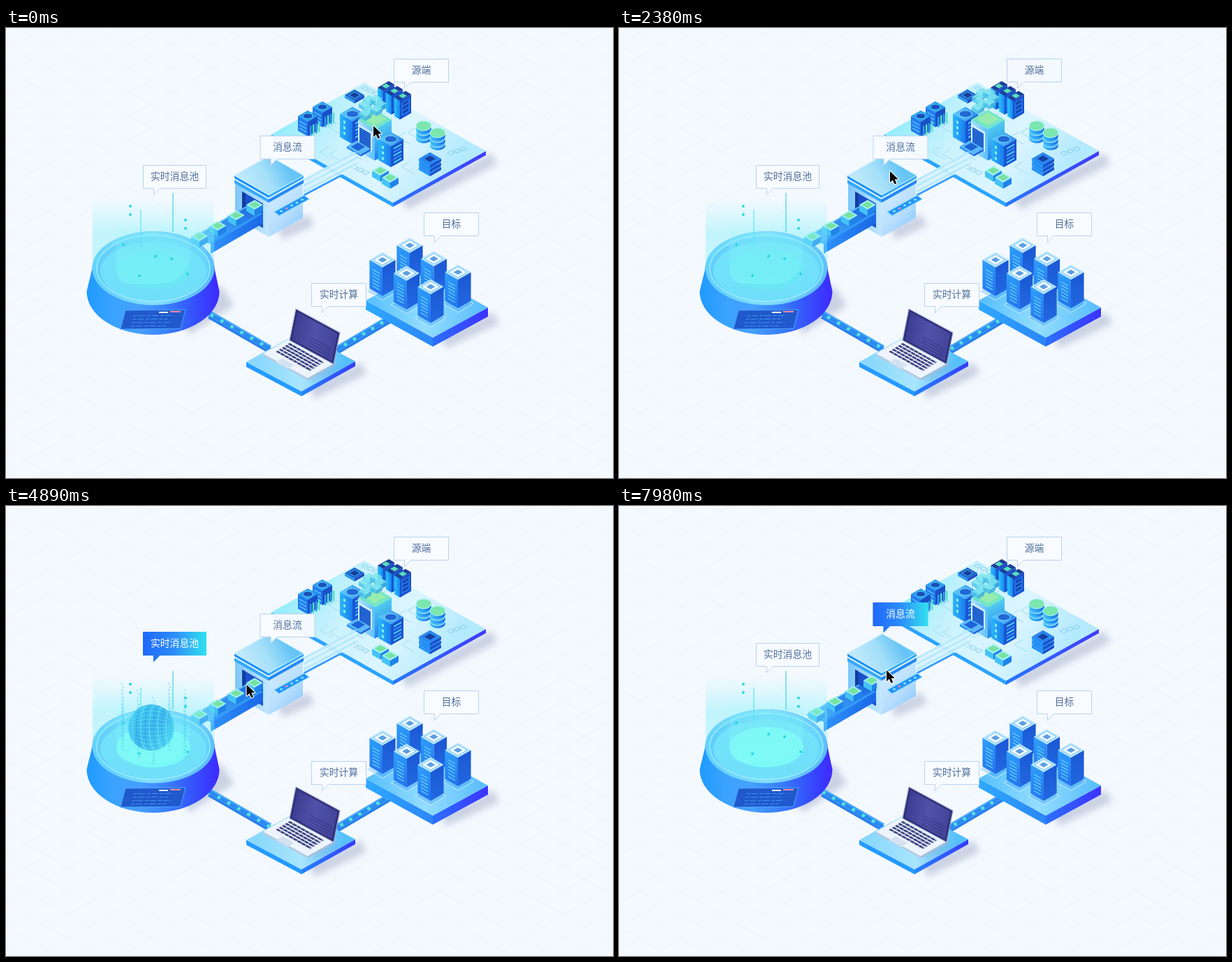
Animation, 869 px wide and 644 px high, one loop 8000 ms. Source, as an HTML page with a canvas:

```html
<!DOCTYPE html>
<html lang="zh">
<head>
<meta charset="utf-8">
<style>
html, body { margin: 0; width: 100%; height: 100%; overflow: hidden; background: #f4f9fe; }
canvas { display: block; width: 869px; height: 644px; }
</style>
</head>
<body>
<canvas id="stage" width="869" height="644"></canvas>
<script>
const c = document.getElementById('stage').getContext('2d');
const LOOP = 8000, STEP = 147.75, K = 0.575;
const clamp = v => Math.max(0, Math.min(1, v));
const smooth = v => { v = clamp(v); return v * v * (3 - 2 * v); };
const mod = (a, b) => ((a % b) + b) % b;
const mix = (a, b, f) => a + (b - a) * f;
const pulse = (t, on, off, d = 320) => smooth((t - on) / d) * (1 - smooth((t - off) / d));
const times = (n, fn) => { for (let i = 0; i < n; i++) fn(i); };
function seeded(seed) {
  return () => (seed = (seed * 16807) % 2147483647) / 2147483647;
}

function lin(x0, y0, x1, y1, ...colors) {
  const g = c.createLinearGradient(x0, y0, x1, y1);
  colors.forEach((col, i) => g.addColorStop(i / (colors.length - 1), col));
  return g;
}
const across = (x0, x1, ...colors) => lin(x0, 0, x1, 0, ...colors);
const down = (y0, y1, ...colors) => lin(0, y0, 0, y1, ...colors);

function paint(fill, stroke, w = 1) {
  if (fill) { c.fillStyle = fill; c.fill(); }
  if (stroke) { c.strokeStyle = stroke; c.lineWidth = w; c.stroke(); }
}
function poly(p, fill, stroke, w) {
  c.beginPath();
  for (let i = 0; i < p.length; i += 2) c.lineTo(p[i], p[i + 1]);
  c.closePath();
  paint(fill, stroke, w);
}
function line(x0, y0, x1, y1, stroke, w = 1) {
  c.beginPath();
  c.moveTo(x0, y0);
  c.lineTo(x1, y1);
  paint(null, stroke, w);
}
function oval(x, y, rx, ry, fill, stroke, w) {
  c.beginPath();
  c.ellipse(x, y, rx, ry, 0, 0, 7);
  paint(fill, stroke, w);
}
function rect(x, y, w, h, fill, stroke) {
  c.beginPath();
  c.rect(x, y, w, h);
  paint(fill, stroke);
}
function local(fn) { c.save(); fn(); c.restore(); }
// Draws in a plane at x,y whose axes are (ux,uy) and (vx,vy).
function plane(x, y, ux, uy, vx, vy, fn) {
  local(() => { c.transform(ux, uy, vx, vy, x, y); fn(); });
}
const wall = (x, y, k, fn) => plane(x, y, 1, k, 0, 1, fn);

// Raised parallelogram given by its left, front and right corners.
function slab(lx, ly, fx, fy, rx, ry, h, top, left, right, edge) {
  poly([lx, ly, fx, fy, fx, fy + h, lx, ly + h], left);
  poly([fx, fy, rx, ry, rx, ry + h, fx, fy + h], right);
  poly([lx, ly, lx + rx - fx, ly + ry - fy, rx, ry, fx, fy], top, edge);
}
// Isometric box; x,y is the centre of its top, a and b the half sides.
function box(x, y, a, b, h, top, left, right, edge) {
  slab(x - a - b, y + K * (b - a), x + a - b, y + K * (a + b), x + a + b, y + K * (a - b), h, top, left, right, edge);
}
const diamond = (x, y, s, fill, stroke) => box(x, y, s, s, 0, fill, null, null, stroke);

function background() {
  rect(0, 0, 869, 644, '#f4f9fe');
  for (let y = -520; y < 1180; y += 34)
    for (const k of [K, -K]) line(0, y, 869, y + 869 * k, 'rgba(205,221,242,.14)');
}
function shadow(x0, y0, x1, y1, w = 18) {
  local(() => {
    c.filter = 'blur(5px)';
    line(x0 + 14, y0, x1 + 12, y1 + 7, 'rgba(125,135,175,.34)', w);
  });
}

function rack(x, y) {
  box(x, y, 4, 8, 27, '#1c3f9c', across(x - 12, x - 4, '#2cc3fa', '#1684f0'), '#1a4fc9');
  diamond(x, y, 3, '#57dfc0');
  wall(x - 4, y + 7, -K, () => {
    rect(2, 4, 12, 20, '#1d74ec');
    times(3, i => rect(4, 6 + i * 6, 8, 3, '#1a3d9e'));
  });
}
function cabinet(x, y, h) {
  box(x, y, 9, 9, h, across(x - 18, x + 18, '#5cccfb', '#2a8df0'),
    across(x - 18, x, '#2cb6fb', '#1a7cee'), '#1a55d2');
  oval(x, y, 9, 5, '#2268d6', '#8ee4ff');
  wall(x, y + 11, -K, () => times(5, i => rect(4, 4 + i * 5, 11, 2, i % 2 ? '#3a94fa' : '#55dcf8')));
  wall(x - 18, y, K, () => times(3, i => rect(5, 6 + i * 8, 3, 4, '#84f3e2')));
}
function storage(x, y) {
  box(x, y, 7, 7, 21, '#2a9df2', '#1f7bee', '#1a50c6');
  oval(x, y, 7, 4, '#1d4fbe', '#55dff0');
  wall(x - 14, y, K, () => times(3, i => rect(2, 5 + i * 5, 10, 2, '#55b8fc')));
  times(4, i => rect(x + 3 + i * 4, y + 14 - i * 2, 2.4, 15, i % 2 ? '#52e3c0' : '#2f9cf0'));
}
function drum(x, y) {
  for (let i = 2; i >= 0; i--) {
    const yy = y + i * 7;
    oval(x, yy + 4, 11, 7, across(x - 11, x + 11, '#3cc8fb', '#1667e4'));
    oval(x, yy, 11, 7, i ? '#46b5f8' : '#7be6ae', '#b4f4fd');
  }
}
function parcel(x, y) {
  box(x, y, 6, 6, 9, '#a5f2ee', '#45c3f5', '#1f83ea');
  diamond(x, y, 4.2, '#76e2a2');
}
function cluster(x, y) {
  local(() => {
    c.globalAlpha = 0.85;
    for (let i = 0; i < 7; i++) {
      const row = Math.floor(i / 2), side = i % 2 ? 1 : -1;
      box(x + side * (row % 2 ? 11 : 5), y - 13 + row * 7, 4.5, 4.5, 6, '#7fe5ee', '#4cc4ea', '#3fb2e2');
    }
  });
}
function traces() {
  const rnd = seeded(11), floor = (x, y, fn) => plane(x, y, 1, K, 1, -K, fn);
  times(16, () => {
    const u = 12 + rnd() * 140, v = 8 + rnd() * 112;
    floor(380, 153, () => {
      line(u, v, u + 18, v, '#a5dff3');
      line(u, v, u, v + 12, '#a5dff3');
    });
  });
  times(3, i => {
    diamond(514 + i * 8, 86 + i * 4, 2.6, null, '#86cdec');
    diamond(499 + i * 8, 199 + i * 4, 2.6, null, '#86cdec');
    diamond(637 + i * 9, 179 - i * 3, 2.6, null, '#86cdec');
  });
}

function sourceBoard(lift) {
  slab(380, 152, 554, 250, 687, 176, 6, lin(420, 100, 630, 220, '#97edfc', '#caf2fd', '#dcf5ff', '#b4eafe'),
    '#2ba4ff', across(554, 687, '#2878ff', '#413bfb'));
  traces();
  box(499, 96, 7, 7, 4, '#1f62cc', '#2998ef', '#194bc1');
  diamond(499, 96, 4, '#173d9a', '#3cb4f2');
  times(3, i => rack(544 + i * 12, 83 + i * 7));
  storage(453, 113);
  storage(432, 126);
  cabinet(496, 123, 33);
  box(528, 131, 12, 12, 45, '#74e6c4', across(503, 528, '#b5e6ff', '#5bbffb'), lin(530, 140, 553, 185, '#55d2f0', '#1c74ec'));
  diamond(528, 130, 8, '#98ecae');
  wall(503, 134, K, () => { rect(1, 3, 20, 28, '#d5f0ff'); rect(3, 6, 16, 23, '#2263d0'); });
  box(505, 171, 10, 7, 3, '#5ab8fa', '#2491f6', '#205ddd');
  diamond(504, 170, 5, '#1d63d6');
  cluster(525, 114 - 10 * lift);
  cabinet(551, 159, 30);
  drum(598, 140);
  drum(618, 150);
  for (let i = 2; i >= 0; i--) box(607, 187 + i * 6, 8, 8, 4, '#2a86ee', '#2395f8', '#1a4fc8');
  diamond(607, 187, 4, '#15409f');
  parcel(536, 204);
  parcel(550, 214);
}

function hub() {
  wall(426, 216, -0.53, () => {
    rect(0, 0, 74, 22, 'rgba(200,240,255,.9)');
    times(6, i => line(0, 2 + i * 4, 78, 2 + i * 4, i % 2 ? '#f3fcff' : '#a3def8'));
    rect(0, 22, 53, 3, '#3199fb');
  });
  slab(328, 218, 376, 246, 425, 219, 53, null, across(328, 376, '#7cc6fb', '#c3e7ff'),
    lin(376, 250, 420, 290, '#cbe8ff', '#b8defd', '#8ccafd'));
  wall(338, 234, K, () => { rect(0, 0, 30, 35, '#1b50cc'); rect(0, 0, 5, 35, '#123d9f'); });
  slab(327, 217, 376, 245, 426, 217, 5, '#e0f7ff', '#36a8fb', '#2689f4');
  slab(327, 211, 376, 239, 426, 211, 4, lin(345, 225, 400, 195, '#bfe8fb', '#a3dff9', '#66c4f6'), '#1d90f6', '#35a8f9', '#c5f3ff');
  plane(384, 263, 1, -0.55, 1, 0.8, () => {
    rect(0, 0, 43, 7, '#2492f7', '#8adcff');
    times(5, i => rect(5 + i * 7.5, 2.5, 3, 2, i === 1 ? '#ff8db2' : '#8ff5ff'));
  });
}

function conveyor(shift) {
  wall(293, 309, -0.58, () => rect(0, 0, 75, 14, across(0, 75, '#2f93fa', '#1a66e6')));
  plane(268, 299, 1, -0.58, 1, 0.4, () => {
    rect(0, 0, 75, 25, across(0, 75, '#4ab4fb', '#206ce2'));
    rect(0, 0, 75, 2, '#62c6fd');
    rect(0, 22, 75, 3, '#2f9cfa');
  });
  local(() => {
    c.beginPath();
    c.rect(262, 220, 107, 110);
    c.clip();
    for (let i = 3; i >= 0; i--) parcel(277 + i * 26.3 + shift, 298 - i * 15 - shift * 0.57);
  });
}

function pipe(x0, y0, x1, y1, first, gap, drift) {
  line(x0, y0 + 3, x1, y1 + 3, '#2a7fec', 8);
  line(x0, y0 - 1, x1, y1 - 1, '#48a9fa', 8);
  line(x0, y0, x1, y1, '#2a8af0', 5);
  for (let x = x0 + mod(first - x0 + drift, gap); x < x1; x += gap)
    oval(x, mix(y0, y1, (x - x0) / (x1 - x0)), 2.6, 2.4, '#58e0d8');
}

function pool(warm) {
  c.beginPath();
  c.ellipse(211, 344, 87.5, 53, 0, Math.PI, 0);
  c.ellipse(210.5, 377, 95, 62, 0, 0, Math.PI);
  c.closePath();
  paint(across(116, 305, '#1f9aff', '#3ba3fd', '#469ffd', '#3a80fa', '#3454fb', '#3e29ff'));
  oval(211, 344, 87.5, 52.5, across(124, 298, '#5cc6fb', '#86dcfd', '#4fa8fb'));
  oval(211, 344, 81, 47, across(130, 292, '#58bcfa', '#6cd3fa', '#5ec6fa'), '#a5ecff', 1.5);
  oval(211, 348, 76, 42, '#70dcfa');
  oval(211, 345, 53, 29, warm ? '#7dfdf5' : '#69e4f3');
  plane(171, 404, 1, -0.01, -0.27, 1, () => {
    rect(0, 0, 86, 27, '#2059cc', '#4ca4fd');
    c.setLineDash([5, 2, 9, 3]);
    times(4, i => line(14, 8 + i * 5, 72 - (i % 2) * 8, 8 + i * 5, '#3f97ec'));
  });
  rect(219, 406, 13, 2, '#eaf7ff');
  rect(235, 405, 15, 2, '#f08aa8');
}

function hologram(glow, t) {
  c.beginPath();
  c.ellipse(211, 344, 87, 53, 0, 0, Math.PI);
  c.lineTo(124, 240);
  c.lineTo(298, 240);
  c.closePath();
  paint(down(242, 396, 'rgba(140,242,252,0)', 'rgba(125,238,250,.42)', 'rgba(115,236,250,.34)', 'rgba(110,238,248,.16)'));
  c.beginPath();
  c.roundRect(158, 268, 105, 98, [0, 0, 40, 20]);
  paint(down(268, 366, 'rgba(140,252,250,0)', 'rgba(135,250,246,.42)'));
  rect(192, 260, 2, 54, 'rgba(83,225,243,.55)');
  rect(238, 236, 2, 56, 'rgba(70,215,240,.65)');
  for (const x of [178, 257]) times(2, i => oval(x, 255 + i * 12 + (x - 178) / 4, 1.9, 1.9, '#20d6dc'));
  times(5, i => oval(168 + i * 23, 335 + 25 * Math.cos(i * 2.6 + 3), 1.9, 1.9, '#20d6dc'));
  if (glow > 0) local(() => {
    c.globalAlpha = glow;
    const rise = 35 * Math.sin((t - 4450) / 260);
    times(5, i => {
      const x = 167 + i * 22.3, top = 218 + (i % 3) * 10 + rise;
      rect(x - 2, top, 4, 98, down(top, top + 98, 'rgba(100,225,255,0)', 'rgba(70,215,246,.35)', 'rgba(80,225,250,.1)'));
      for (let y = 0; y < 96; y += 5) rect(x - 2 + (y % 3), top + y, 1.5, 2, 'rgba(60,190,235,.55)');
    });
    sphere(208, 317, 33, t);
  });
}
function sphere(x, y, r, t) {
  oval(x, y, r, r, lin(x - r, y - r, x + r, y + r, '#3ccbf2', '#3ab3ee', '#51dcf2'));
  c.clip();
  c.translate(x, y);
  c.rotate(0.35 + t / 4000);
  for (let i = -5; i <= 5; i++) {
    c.beginPath();
    c.ellipse(0, i * 6, r, 9, 0, 0, Math.PI);
    paint(null, i % 2 ? '#80eff6' : '#2f9ae0', 0.8);
    oval(0, 0, Math.abs(i) * 6, r, null, 'rgba(100,231,246,.5)', 0.7);
  }
}

function laptop() {
  slab(344, 478, 423, 520, 500, 477, 7, across(360, 485, '#8ad8fc', '#a8e5fe', '#55bffb'),
    '#259bff', across(423, 500, '#2684ff', '#353bfb'));
  shadow(424, 502, 462, 478, 6);
  slab(368, 466, 432, 501, 471, 479, 3, '#edf4fc', '#b9c8dd', '#a9bbd6');
  plane(407, 449, 1, 0.56, -0.9, 0.57, () => {
    times(5, i => rect(1, 2 + i * 4.8, 49, 3, '#3d4382'));
    times(8, i => rect(6 + i * 6, 0, 0.8, 25, '#dfe8f4'));
    rect(14, 28, 17, 10, '#d3e1f0');
  });
  plane(415, 402, 1, 0.54, -0.2, 1, () => {
    rect(0, 0, 63, 45, '#303078', '#9aa9d6');
    rect(3, 3, 57, 39, across(3, 60, '#3d3d92', '#5052a9', '#44449a'));
    times(4, i => rect(26, 26 + i * 4, 30, 1, 'rgba(39,39,110,.6)'));
  });
}

function tower(x, y) {
  diamond(x, y + 45, 11, 'rgba(67,159,250,.3)', '#c9efff');
  box(x, y, 9.3, 9.3, 41, '#b5e4fd', lin(x - 18, y, x, y + 45, '#2f9ffb', '#2478ee'),
    down(y, y + 50, '#1a57d4', '#2268e0'));
  diamond(x, y, 6.6, '#f3fbff', '#7cc8f6');
  diamond(x, y, 3.2, '#5ba0e2');
  wall(x - 14, y + 6, K, () => times(6, i => rect(0, 7 + i * 4.7, 10, 1.6, '#62ccfb')));
}
function targetBoard() {
  slab(515, 390, 611, 443, 690, 400, 13, across(520, 680, '#58c0fc', '#93ddfe', '#5cbffc'),
    across(515, 611, '#2da9ff', '#2c86f6'), across(611, 690, '#2c70ff', '#3c32ff'));
  times(3, col => times(2, row => tower(578 + col * 34.5 - row * 39, 311 + col * 19.2 + row * 20.8)));
}

function label(text, x, y, w, up = 0) {
  const top = y - 16 * up, base = top + 33;
  const shape = (fill, stroke) => poly([x, top, x + w, top, x + w, base, x + 24, base, x + 15, base + 9, x + 15, base, x, base], fill, stroke);
  shape('rgba(248,251,255,.96)', '#b9d2ef');
  local(() => {
    c.globalAlpha = up;
    const blue = across(x, x + w, '#1e68fb', '#2d8df8', '#32e0ef');
    if (up > 0) shape(blue, blue);
  });
  c.font = '13.8px "Noto Sans CJK SC", "Noto Sans CJK", sans-serif';
  c.textAlign = 'center';
  c.textBaseline = 'middle';
  c.fillStyle = up > 0.5 ? '#fff' : '#4f6e9b';
  c.fillText(text, x + w / 2, top + 15.5);
}

const PATH = [[0, 526, 140], [1650, 512, 128], [2360, 388, 205], [3550, 314, 265],
  [4440, 323, 291], [5620, 393, 177], [6100, 388, 212], [LOOP, 383, 235]];
const ARROW = new Path2D('M0 0V16L3.8 12.5 6.5 18.5 9.3 17.3 6.7 11.5 11.7 11.2Z');
const BEAM = new Path2D('M-3-7L0-5 3-7M0-5V7M-3 9L0 7 3 9M-2 4H2');
function cursor(t) {
  const n = PATH.findIndex(p => p[0] > t), [t0, x0, y0] = PATH[n - 1], [t1, x1, y1] = PATH[n];
  const f = smooth((t - t0) / (t1 - t0)), typing = t > 5450 && t < 5850;
  local(() => {
    c.translate(mix(x0, x1, f), mix(y0, y1, f));
    c.lineJoin = 'round';
    c.strokeStyle = '#fff';
    c.lineWidth = typing ? 3.5 : 2.2;
    c.stroke(typing ? BEAM : ARROW);
    c.strokeStyle = c.fillStyle = '#000';
    c.lineWidth = 1.4;
    if (typing) c.stroke(BEAM); else c.fill(ARROW);
  });
}

function draw(t) {
  const source = pulse(t, 120, 2060, 330), poolUp = pulse(t, 3740, 5060);
  const hubUp = pulse(t, 2420, 3040) + pulse(t, 5930, LOOP);
  const run = t > 5930 ? t - 5930 : t > 2420 && t < 3360 ? t - 2420 : 0;
  const shift = mod(4 - run / 44, 26.3) - 4;
  const drift = -0.0038 * t;

  background();
  shadow(556, 252, 687, 180);
  shadow(378, 294, 425, 268);
  shadow(240, 424, 305, 376, 34);
  shadow(424, 522, 500, 480);
  shadow(612, 450, 690, 408);
  pipe(291, 409, 378, 459, 295, 14.2, drift);
  pipe(474, 460, 552, 414, 486, 13, drift);
  sourceBoard(pulse(t, 120, 2250, 900));
  hub();
  pool(t > 4300);
  conveyor(shift);
  hologram(poolUp, t);
  laptop();
  targetBoard();
  label('源端', 555.5, 44.5, 78, source);
  label('消息流', 364, 154.5, 78, hubUp);
  label('实时消息池', 196.5, 196.5, 90, poolUp);
  label('目标', 598.5, 264.5, 78);
  label('实时计算', 437.5, 365.5, 78);
  cursor(t);
}

let shown = -1;
const start = performance.now();
function tick() {
  const step = Math.floor(((performance.now() - start) % LOOP) / STEP);
  if (step !== shown) draw((shown = step) * STEP);
  requestAnimationFrame(tick);
}
tick();
</script>
</body>
</html>
```
